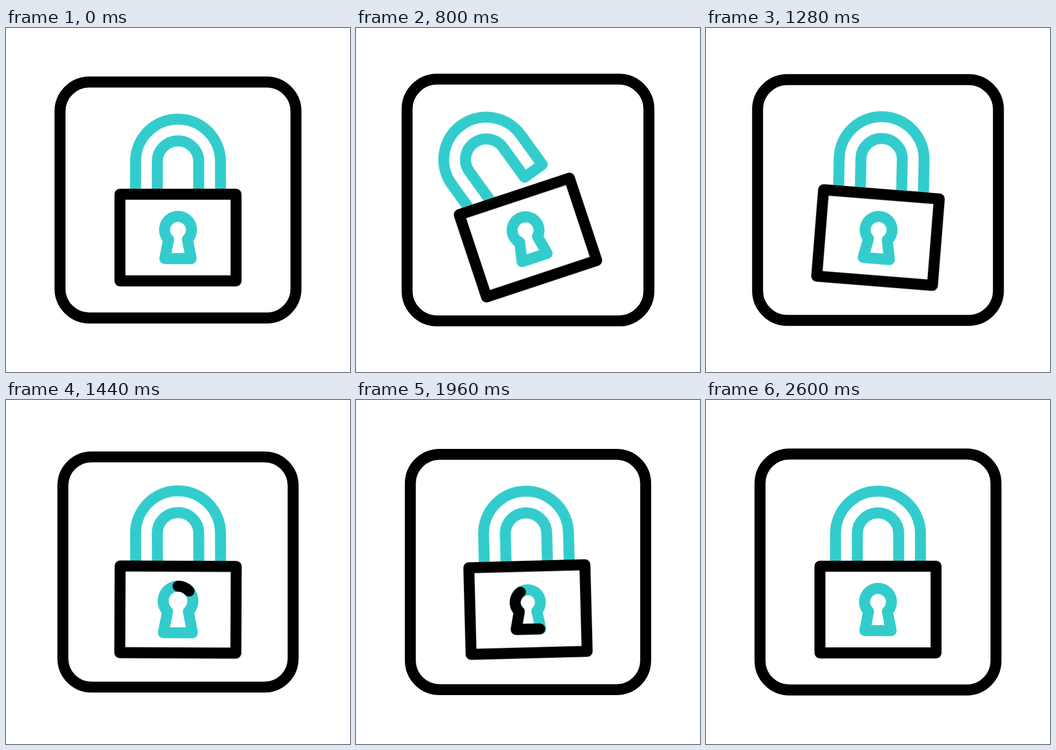
Animation of 640x640 px, one loop 3000 ms. Source, as an HTML page without scripts:

```html
<!DOCTYPE html>
<html lang="en">
<head>
<meta charset="utf-8">
<title>Padlock</title>
<style>
  @property --s { syntax: '<number>'; inherits: true; initial-value: 1; }
  @property --tail { syntax: '<number>'; inherits: true; initial-value: 0; }
  @property --head { syntax: '<number>'; inherits: true; initial-value: 0; }

  html, body { margin: 0; width: 100%; height: 100%; overflow: hidden; background: #fff; }
  svg { display: block; width: 100%; height: 100%; }

  g, path, rect {
    transform-box: view-box;
    transform-origin: 320px 390px;
    animation: 3s cubic-bezier(.333, 0, .667, 1) infinite;
  }
  path, rect {
    fill: none;
    stroke: #000;
    stroke-width: 20.4px;
    stroke-linejoin: round;
    stroke-linecap: round;
  }
  .teal { stroke: #3cc; }

  /* scaled parts keep a constant line weight */
  .frame, .hole { transform: scale(var(--s)); }
  .frame, .hole path { stroke-width: calc(20.4px / var(--s)); }

  .frame { transform-origin: 320px 320px; animation-name: pulse; }
  .lock { animation-name: swing; }
  .shackle { transform-origin: 239px 329px; animation-name: open; }
  .body { fill: #fff; }
  .hole { animation-name: pop; }
  .trail {
    stroke-dasharray: calc((var(--head) - var(--tail)) * 1px) 200px;
    stroke-dashoffset: calc(var(--tail) * -1px);
    animation-name: head, tail, show;
  }

  @keyframes pulse {
    0%, 6.667% { --s: 1; }
    18.667% { --s: .951; }
    33.333% { --s: 1.08; }
    52% { --s: .962; }
    68%, 100% { --s: 1; }
  }
  @keyframes swing {
    0%, 6.667% { transform: rotate(0deg); }
    22% { transform: rotate(-22.4deg); }
    41.333% { transform: rotate(4.8deg); }
    56.667% { transform: rotate(-6.4deg); }
    73.333% { transform: rotate(2.8deg); }
    86.667%, 100% { transform: rotate(0deg); }
  }
  @keyframes open {
    0%, 6.667% { transform: rotate(0deg); }
    20% { transform: rotate(-20deg); }
    50.667%, 100% { transform: rotate(0deg); }
  }
  @keyframes pop {
    0%, 43.333% { --s: 1; }
    53.333% { --s: 1.23; }
    66.667% { --s: .925; }
    76.667%, 100% { --s: 1; }
  }
  @keyframes head {
    0%, 43.333% { --head: 0; }
    69.333%, 100% { --head: 100; }
  }
  @keyframes tail {
    0%, 54% { --tail: 0; }
    80%, 100% { --tail: 100; }
  }
  @keyframes show {
    0% { opacity: 0; animation-timing-function: step-end; }
    43.4% { opacity: 1; animation-timing-function: step-end; }
    79.9%, 100% { opacity: 0; animation-timing-function: step-end; }
  }
</style>
</head>
<body>
<svg viewBox="0 0 640 640" xmlns="http://www.w3.org/2000/svg">
  <defs>
    <path id="unused" d=""/>
  </defs>
  <rect class="frame" x="100.5" y="100.5" width="439" height="439" rx="54.5"/>
  <g class="lock">
    <path class="shackle teal" d="M241 317V248.5a79 79 0 0 1 158 0V317H358.5V248.5a38.5 38.5 0 0 0-77 0V317Z"/>
    <rect class="body" x="212" y="309.3" width="216" height="161.2"/>
    <g class="hole">
      <path class="teal" d="M320 350.5a25 25 0 0 1 17.5 42.9l7 35.6h-49l7-35.6a25 25 0 0 1 17.5-42.9Z"/>
      <path class="trail" pathLength="100" d="M320 350.5a25 25 0 0 1 17.5 42.9l7 35.6h-49l7-35.6a25 25 0 0 1 17.5-42.9Z"/>
    </g>
  </g>
</svg>
</body>
</html>
```
